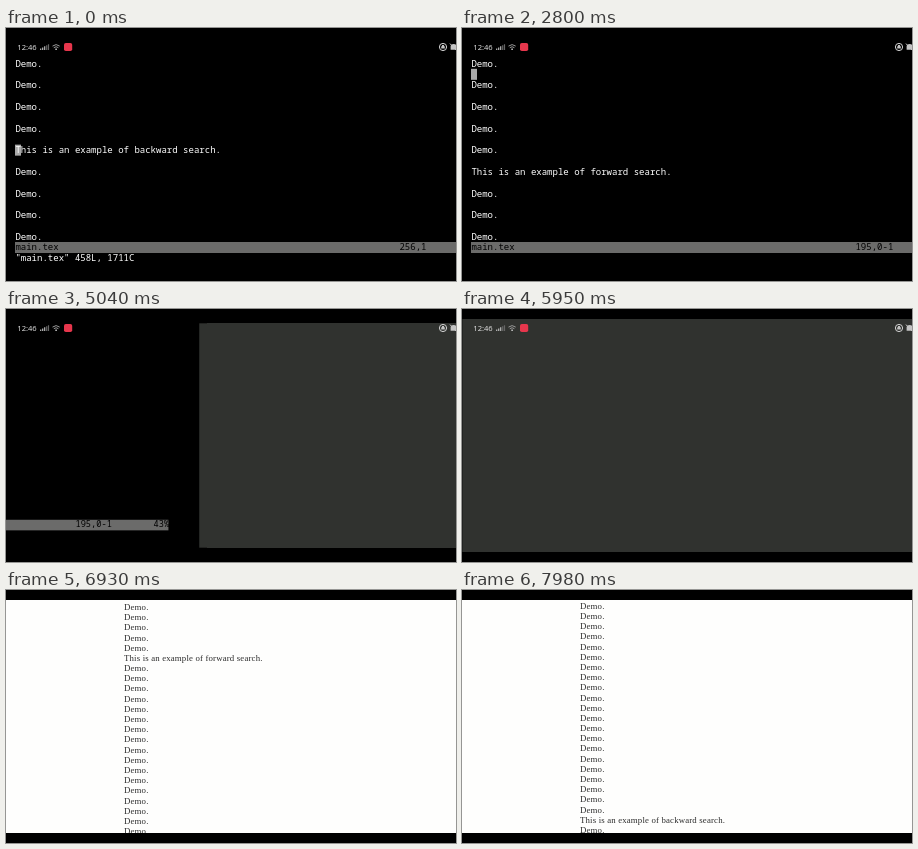
An HTML page for the animation above (8 s loop, 450 by 253 pixels).

```html
<!DOCTYPE html>
<html lang="en">
<head>
<meta charset="utf-8">
<title>Editor and document search</title>
<style>
  html, body { margin: 0; width: 100%; height: 100%; overflow: hidden; background: #000; }
  #view { position: absolute; left: 0; top: 10px; width: 450px; height: 233px; overflow: hidden; }
  #view div, #view pre, #view svg { position: absolute; margin: 0; }

  /* Two app screens side by side; the deck slides from one to the other. */
  #deck { left: 0; top: 0; width: 500px; height: 233px; animation: slide 8s step-end infinite; }
  #blank { left: 521.7px; top: 0; width: 500px; height: 233px; background: #30322f; }
  #term { font: 500 9.02px/10.83px "Noto Sans Mono", "DejaVu Sans Mono", monospace; color: #fff; }
  #term pre { font: inherit; left: 9.4px; white-space: pre; }
  #rows { top: 20.6px; }
  #term #ruler { top: 204.2px; width: 481px; height: 10.83px; background: #6b6b6a; color: #000; font-weight: 400; }
  #cmd { top: 215.4px; }
  #term #cursor { top: 20.1px; width: 5.6px; height: 10.83px; background: #a9a9a9; }

  #bar { left: 0; top: 0; }
  #bar text { font: 7.6px "Noto Sans", "Open Sans", sans-serif; fill: #dedede; }

  #paper { left: 0; top: 0; width: 450px; height: 233px; background: #fefefd; opacity: 0; animation: appear 8s step-end infinite; }
  #lines { left: 118px; top: -28.6px; font: 8.8px/10.19px "Liberation Serif", "Noto Serif", serif;
    letter-spacing: .16px; color: #2c2c2c; white-space: pre; animation: scroll 8s step-end infinite; }

  @keyframes slide {
    0% { transform: none; }
    62.125% { transform: translateX(-110px) scale(.975); }
    63% { transform: translateX(-318.7px) scale(.963); }
    63.875% { transform: translateX(-425px) scale(.972); }
    64.75% { transform: translateX(-478px) scale(.984); }
    65.625% { transform: translateX(-505px) scale(.993); }
    66.5% { transform: translateX(-517px) scale(.998); }
    67.375%, 100% { transform: translateX(-521.7px); }
  }
  @keyframes appear {
    0% { opacity: 0; }
    77.875% { opacity: .25; }
    78.75% { opacity: .55; }
    79.625% { opacity: .8; }
    80.5% { opacity: .95; }
    81.375%, 100% { opacity: 1; }
  }
  @keyframes scroll {
    0% { transform: translateY(1px); }
    86.625% { transform: none; }
    87.5% { transform: translateY(-.7px); }
    88.375% { transform: translateY(-1.4px); }
    89.25% { transform: translateY(-2px); }
    92.75% { transform: translateY(-12px); }
    93.625% { transform: translateY(-30px); }
    94.5% { transform: translateY(-48px); }
    95.375% { transform: translateY(-64px); }
    96.25% { transform: translateY(-76px); }
    98% { transform: translateY(-84px); }
    98.875% { transform: translateY(-94px); }
    99.75%, 100% { transform: translateY(-102.9px); }
  }
</style>
</head>
<body>
<div id="view">
  <div id="deck">
    <div id="term">
      <pre id="rows"></pre>
      <pre id="ruler"></pre>
      <pre id="cmd"></pre>
      <pre id="cursor"></pre>
    </div>
    <div id="blank"></div>
  </div>
  <svg id="bar" width="450" height="20" viewBox="0 10 450 20">
    <text x="11.3" y="22">12:46</text>
    <path d="M34.7 22v-1.6M36.7 22v-2.6M38.7 22v-3.7" stroke="#bbb" stroke-width="1.2"/>
    <path d="M40.7 22v-4.8M42.5 22v-5.8" stroke="#666" stroke-width="1.2"/>
    <g fill="none" stroke="#999">
      <path d="M46.5 18.1q3.6-3 7.2 0M47.8 19.7q2.3-1.9 4.6 0" stroke-width="1"/>
      <path d="M50.1 20.4v1.6" stroke="#ccc" stroke-width="1.5"/>
    </g>
    <g fill="none" stroke="#d4d4d4">
      <circle cx="437" cy="19" r="3.6"/>
      <path d="M444 15.6l6.4 6.8"/>
    </g>
    <path d="M435.2 18.2h3.6v2.3h-3.6zM436 18.2v-1.2h2v1.2M444.6 21.8v-3.3q0-2.6 3-2.6t3 2.6v3.3z" fill="#c4c4c4"/>
    <rect x="58" y="15" width="8.2" height="8" rx="1.8" fill="#e6364c"/>
  </svg>
  <div id="paper"><div id="lines"></div></div>
</div>
<script>
  const LOOP = 8000, STEP = 70, ROWS = 17, TOTAL = 458;
  const ROW_H = 10.83, CELL = 5.41;
  const FORWARD = 204, BACKWARD = 256;
  const el = id => document.getElementById(id);

  // Paragraphs sit on even lines, blank lines between them.
  function lineText(n) {
    if (n % 2) return '';
    if (n === FORWARD) return 'This is an example of forward search.';
    if (n === BACKWARD) return 'This is an example of backward search.';
    return 'Demo.';
  }

  const span = (first, count, step = 1) =>
    Array.from({ length: count }, (_, i) => lineText(first + i * step)).join('\n');

  function cursorLine(t) {
    if (t < 700) return BACKWARD;
    if (t < 1120) return 255;
    const k = Math.min(20, Math.floor((t - 1120) / STEP));
    const n = Math.floor(253 - 2.9 * k);
    return k < 12 ? n : n | 1;
  }

  function command(t) {
    if (t >= 4130) return ':fs';
    if (t >= 3780) return ':f';
    if (t >= 3570) return ':';
    return '';
  }

  function draw(t) {
    const n = cursorLine(t), top = Math.min(248, n - 1);
    const typed = command(t);
    const here = lineText(n);
    const place = `${n},${here ? '1' : '0-1'}`;
    const percent = Math.floor((top - 1) * 100 / (TOTAL - ROWS));

    el('rows').textContent = span(top, ROWS);
    el('ruler').textContent = 'main.tex'.padEnd(71) + place.padEnd(15) + percent + '%';
    el('cmd').textContent = typed || (top === 248 ? '"main.tex" 458L, 1711C' : '');

    const row = typed ? 18 : n - top, col = typed.length;
    const cursor = el('cursor');
    cursor.textContent = typed ? '' : here.charAt(0);
    cursor.style.transform = `translate(${col * CELL}px, ${row * ROW_H}px)`;
    cursor.style.visibility = t >= 4200 ? 'hidden' : 'visible';
  }

  el('lines').textContent = span(FORWARD - 16, 48, 2);

  const start = performance.now();
  function tick() {
    draw((performance.now() - start) % LOOP);
    requestAnimationFrame(tick);
  }
  tick();
</script>
</body>
</html>
```
